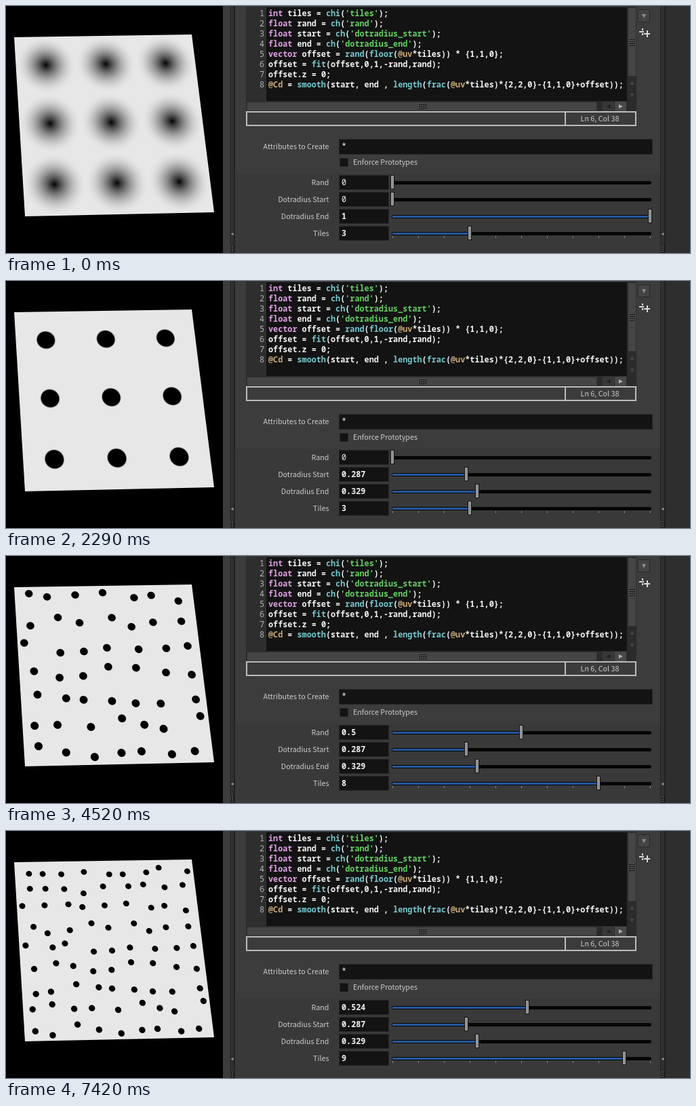
These frames come from a looping animation (1009x364 px, 8080 ms). An HTML page with a canvas:

```html
<!DOCTYPE html>
<html lang="en">
<head>
<meta charset="utf-8">
<title>Random dots</title>
<style>
html, body { margin: 0; width: 100%; height: 100%; overflow: hidden; background: #000; }
canvas { display: block; }
</style>
</head>
<body>
<canvas id="stage" width="1009" height="364"></canvas>
<script>
const LOOP = 8080;
const ctx = document.getElementById('stage').getContext('2d');

// ---------- timeline ----------
// A drag is sampled in n held steps between t0 and t1.
function drag(t, t0, t1, n, from, to, power) {
  if (t < t0) return from;
  const step = (t1 - t0) / (n - 1);
  const p = Math.min(1, (Math.floor((t - t0) / step + 0.1) + 1) / n);
  return from + (to - from) * (1 - (1 - p) ** power);
}

function randAt(t) {
  if (t < 5930) return drag(t, 2950, 3610, 9, 0, 0.5, 2);
  if (t < 7010) return drag(t, 5930, 6090, 3, 0.5, 0, 0.77);
  return drag(t, 7010, 7420, 6, 0, 0.524, 1.7);
}

// Tiles go up one by one in two bursts.
function tilesAt(t) {
  const from = t < 4430 ? 3 : 6, t0 = t < 4430 ? 4100 : 4430;
  return Math.round(drag(t, t0, t0 + 165, 3, from, from + 3, 1));
}

const round3 = v => Math.round(v * 1000) / 1000;

function stateAt(t) {
  return {
    rand: round3(randAt(t)),
    start: round3(drag(t, 750, 1150, 6, 0, 0.287, 2.18)),
    end: round3(drag(t, 1560, 2290, 10, 1, 0.329, 2.08)),
    tiles: tilesAt(t),
    cooked: t < 4600 ? tilesAt(t - 70) : 9,
    randBold: (t >= 3610 && t < 6340) || t >= 7420,
    startBold: t >= 1150
  };
}

// ---------- dotted plane ----------
// Cells count from the lower right corner, so a cell keeps its drift in every grid.
const MAX_TILES = 9;
const nearDrift = [
  [[-.66, .28], [-.12, .68], [-.6, .15]],
  [[.79, -.97], [-.95, .85], [.23, .18]],
  [[.43, .47], [-.96, 1], [-.74, .88]]
];

function hash(i, j, seed) {
  const v = Math.sin(i * 12.9898 + j * 78.233 + seed) * 43758.5453;
  return 2 * (v - Math.floor(v)) - 1;
}

const drift = Array.from({ length: MAX_TILES }, (_, j) =>
  Array.from({ length: MAX_TILES }, (_, i) =>
    nearDrift[j]?.[i] ?? [hash(i, j, 1), hash(i, j, 5)]));

const corners = [[12, 46], [274, 42], [307, 304], [28, 310]];
const box = { x: 12, y: 41, w: 297, h: 271 };
const SS = 2;
const plane = document.createElement('canvas');
plane.width = box.w * SS;
plane.height = box.h * SS;
const planeCtx = plane.getContext('2d');
const texels = planeCtx.createImageData(plane.width, plane.height);

// Projective map from the unit square to the four corners.
const view = (() => {
  const [[x0, y0], [x1, y1], [x2, y2], [x3, y3]] = corners;
  const sx = x0 - x1 + x2 - x3, sy = y0 - y1 + y2 - y3;
  const ax = x1 - x2, ay = y1 - y2, bx = x3 - x2, by = y3 - y2;
  const det = ax * by - ay * bx;
  const g = (sx * by - sy * bx) / det, h = (ax * sy - ay * sx) / det;
  return {
    g, h, c: x0, f: y0,
    a: x1 - x0 + g * x1, b: x3 - x0 + h * x3,
    d: y1 - y0 + g * y1, e: y3 - y0 + h * y3
  };
})();

function unproject(x, y) {
  const { a, b, c, d, e, f, g, h } = view;
  const m = a - g * x, n = b - h * x, p = d - g * y, q = e - h * y;
  const det = m * q - n * p;
  return [((x - c) * q - (y - f) * n) / det, (m * (y - f) - p * (x - c)) / det];
}

function smooth(lo, hi, v) {
  const p = Math.min(1, Math.max(0, (v - lo) / (hi - lo)));
  return p * p * (3 - 2 * p);
}

function shadePlane({ rand, start, end, cooked: n }) {
  const data = texels.data;
  const cell = v => Math.max(0, Math.min(n - 1, Math.floor(v)));
  let k = 0;
  for (let py = 0; py < plane.height; py++) {
    for (let px = 0; px < plane.width; px++, k += 4) {
      const [s, t] = unproject(box.x + (px + 0.5) / SS, box.y + (py + 0.5) / SS);
      const col = cell(s * n), row = cell(t * n);
      const [ox, oy] = drift[n - 1 - row][n - 1 - col];
      const dx = 2 * (s * n - col) - 1 - ox * rand;
      const dy = 2 * (t * n - row) - 1 - oy * rand;
      const lit = smooth(start, end, Math.sqrt(dx * dx + dy * dy));
      data[k] = data[k + 1] = data[k + 2] = 231 * lit ** (1 / 2.2);
      data[k + 3] = 255;
    }
  }
  planeCtx.putImageData(texels, 0, 0);
}

function drawPlane(state) {
  shadePlane(state);
  ctx.save();
  ctx.beginPath();
  corners.forEach(([x, y]) => ctx.lineTo(x, y));
  ctx.clip();
  ctx.drawImage(plane, box.x, box.y, box.w, box.h);
  ctx.restore();
}

// ---------- drawing helpers ----------
const SANS = '"Noto Sans CJK JP", "Noto Sans CJK SC", "Noto Sans", sans-serif';
const ADVANCE = 7.08;
const monoFont = '11.8px "Noto Sans Mono", monospace';
const boldFont = `bold ${monoFont}`;

// Font size at which the sample has the wanted natural width.
function sizeFor(family, sample, width) {
  ctx.font = `100px ${family}`;
  return 100 * width / ctx.measureText(sample).width;
}
const sansFont = `${sizeFor(SANS, 'Attributes to Create', 97).toFixed(2)}px ${SANS}`;

function rect(x, y, w, h, color) {
  ctx.fillStyle = color;
  ctx.fillRect(x, y, w, h);
}

function frame(x, y, w, h, color, line = 1) {
  ctx.strokeStyle = color;
  ctx.lineWidth = line;
  ctx.strokeRect(x + line / 2, y + line / 2, w - line, h - line);
}

function text(str, x, y, font, color, align = 'left') {
  ctx.font = font;
  ctx.fillStyle = color;
  ctx.textAlign = align;
  ctx.fillText(str, x, y);
}

const label = (str, x, y, align) => text(str, x, y, sansFont, '#cccccc', align);

// Triangle pointing along (dx, dy).
function arrow(x, y, dx, dy, r, color) {
  ctx.fillStyle = color;
  ctx.beginPath();
  ctx.moveTo(x + dx * r, y + dy * r);
  ctx.lineTo(x - dx * r + dy * r, y - dy * r + dx * r);
  ctx.lineTo(x - dx * r - dy * r, y - dy * r - dx * r);
  ctx.fill();
}

// Embossed dots of a drag handle.
function grip(x, y, cols, rows, light = '#8c8c8c') {
  for (let i = 0; i < cols; i++) {
    for (let j = 0; j < rows; j++) {
      rect(x + i * 3, y + j * 3, 2, 2, '#080808');
      rect(x + i * 3, y + j * 3, 1, 1, light);
    }
  }
}

function field(x, y, w, h) {
  rect(x, y, w, h, '#131313');
  frame(x, y, w, h, '#262626');
}

// ---------- interface ----------
const code = [
  "int tiles = chi('tiles');",
  "float rand = ch('rand');",
  "float start = ch('dotradius_start');",
  "float end = ch('dotradius_end');",
  'vector offset = rand(floor(@uv*tiles)) * {1,1,0};',
  'offset = fit(offset,0,1,-rand,rand);',
  'offset.z = 0;',
  '@Cd = smooth(start, end , length(frac(@uv*tiles)*{2,2,0}-{1,1,0}+offset));'
];
const token = /('[^']*')|(@\w+)|\b(int|float|vector)\b|(\w+(?=\())|[^'@\w]+|\w+/g;
const inks = ['#66d063', '#c9a877', '#e2a0e6', '#73c9cf'];

function drawCode() {
  rect(354, 1, 576, 155, '#2b2b2b');
  rect(355, 2, 29, 138, '#2e2e2e');
  rect(384, 2, 532, 138, '#131313');
  code.forEach((line, i) => {
    const y = 15 + i * 15;
    text(String(i + 1), 381, y, monoFont, '#b4b4b4', 'right');
    for (const m of line.matchAll(token)) {
      const kind = m.slice(1).findIndex(Boolean);
      text(m[0], 387 + m.index * ADVANCE, y, boldFont, kind < 0 ? '#f4f4f4' : inks[kind]);
    }
  });
}

function drawEditorFrame() {
  rect(917, 2, 13, 102, '#454545');
  frame(917, 2, 13, 102, '#303030');
  grip(919, 48, 3, 4);
  arrow(923.5, 113, 0, -1, 3, '#454545');
  arrow(923.5, 132, 0, 1, 3, '#454545');

  rect(355, 141, 517, 14, '#454545');
  frame(355, 141, 517, 14, '#303030');
  grip(609, 144, 4, 3);
  rect(880, 141, 17, 14, '#383838');
  rect(898, 141, 17, 14, '#484848');
  arrow(888.5, 148, -1, 0, 3, '#202020');
  arrow(907, 148, 1, 0, 3, '#b0b0b0');

  rect(354, 155, 576, 22, '#3b3b3b');
  frame(354, 155, 576, 22, '#bcbcbc', 2);
  rect(824, 157, 2, 18, '#bcbcbc');
  label('Ln 6, Col 38', 876, 170, 'center');

  rect(932, 5, 18, 19, '#444444');
  frame(932, 5, 18, 19, '#292929');
  arrow(941, 15, 0, 1, 3, '#8c8c8c');
  const white = '#d8d8d8';
  rect(934, 37, 7, 2, white);
  rect(938, 33, 2, 3, white);
  rect(938, 40, 2, 3, white);
  rect(941, 40, 9, 2, white);
  rect(945, 36, 2, 10, white);
}

function drawSplitter(x) {
  rect(x - 1, 0, 8, 364, '#222222');
  rect(x, 0, 5, 364, '#303030');
  arrow(x + 2.5, 336, -1, 0, 2, '#999999');
  grip(x, 355, 2, 3, '#aaaaaa');
}

function drawPanel() {
  rect(0, 0, 1009, 364, '#000000');
  rect(320, 0, 689, 364, '#3c3c3c');
  rect(329, 0, 1, 364, '#484848');
  rect(337, 247, 628, 117, '#393939');
  rect(971, 0, 38, 364, '#2e2e2e');
  drawSplitter(331);
  drawSplitter(966);
  drawCode();
  drawEditorFrame();

  label('Attributes to Create', 476.5, 211, 'right');
  field(491, 196, 463, 23);
  text('*', 495, 211, monoFont, '#f0f0f0');
  field(492, 224, 13, 13);
  label('Enforce Prototypes', 512, 234);
}

function drawSlider(name, y, value, part, bold, ticks) {
  label(name, 476.5, y + 4, 'right');
  field(491, y - 11, 74, 22);
  text(String(value), 495, y + 4, bold ? boldFont : monoFont, '#f4f4f4');

  const x = Math.round(570 + 380 * part);
  ctx.fillStyle = '#050505';
  ctx.beginPath();
  ctx.roundRect(569, y - 2, 383, 5, 2);
  ctx.fill();
  rect(570, y - 1, x - 570, 3, '#2458a0');
  if (ticks) for (let i = 0; i <= 10; i++) rect(570 + i * 38, y + 4, 1, 3, '#8a8a8a');

  rect(x - 3, y - 11, 6, 21, '#111111');
  rect(x - 2, y - 10, 4, 19, '#8c8c8c');
  frame(x - 2, y - 10, 4, 19, '#a4a4a4');
}

function draw(state) {
  drawPanel();
  drawPlane(state);
  drawSlider('Rand', 260, state.rand, state.rand, state.randBold);
  drawSlider('Dotradius Start', 285, state.start, state.start, state.startBold);
  drawSlider('Dotradius End', 310, state.end, state.end, true);
  drawSlider('Tiles', 335, state.tiles, state.tiles / 10, true, true);
}

let origin = null, shown = '';
function tick(now) {
  if (origin === null) origin = now;
  const state = stateAt((now - origin) % LOOP);
  const key = JSON.stringify(state);
  if (key !== shown) {
    shown = key;
    draw(state);
  }
  requestAnimationFrame(tick);
}
requestAnimationFrame(tick);
</script>
</body>
</html>
```
